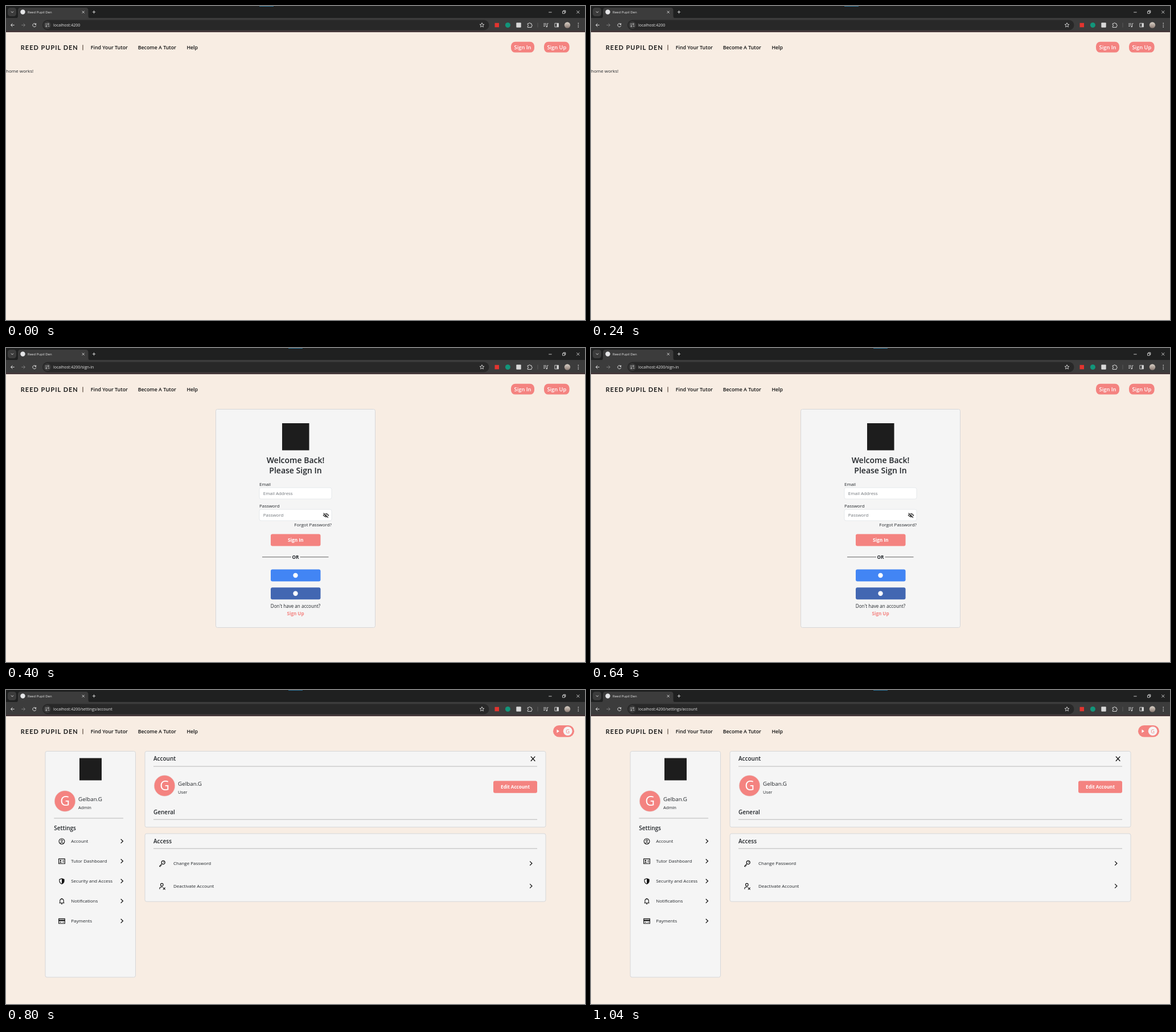
Animation of 1017 by 551 pixels, one loop 1.2 s. Source, as an HTML page:

```html
<!DOCTYPE html>
<html lang="en">
<head>
<meta charset="utf-8">
<title>Reed Pupil Den</title>
<style>
  html, body { margin: 0; width: 100%; height: 100%; overflow: hidden; background: #f8ede3; }
  svg { display: block; width: 100vw; height: 100vh; }
  text { font-family: "Open Sans", "Noto Sans", sans-serif; white-space: pre; }
</style>
</head>
<body>
<svg id="stage" viewBox="0 0 1017 551" preserveAspectRatio="none"></svg>
<script>
const INK = '#212529', CORAL = '#f48380', PANEL = '#f5f5f5', ICON = '#d6d6d6', BAR = '#3c3c3c';
const SITE = 'Reed Pupil Den', USER = 'Gelban.G';
const STEP = 400;
const PAGES = ['', '/sign-in', '/settings/account'];

const text = (x, y, str, size, o = {}) =>
  `<text x="${x}" y="${y}" font-size="${size}" fill="${o.fill || INK}" font-weight="${o.weight || 400}"` +
  ` text-anchor="${o.anchor || 'start'}" ${o.extra || ''}>${str}</text>`;
const rect = (x, y, w, h, fill, rx = 0, extra = '') =>
  `<rect x="${x}" y="${y}" width="${w}" height="${h}" rx="${rx}" fill="${fill}" ${extra}/>`;
const circle = (x, y, r, fill, extra = '') =>
  `<circle cx="${x}" cy="${y}" r="${r}" fill="${fill}" ${extra}/>`;
const line = (d, color = INK, width = 1, extra = '') =>
  `<path d="${d}" fill="none" stroke="${color}" stroke-width="${width}" ${extra}/>`;
const shape = (d, fill = INK) => `<path d="${d}" fill="${fill}" fill-rule="evenodd"/>`;
const at = (x, y, body) => `<g transform="translate(${x} ${y})">${body}</g>`;

const panel = (x, y, w, h) => rect(x, y, w, h, PANEL, 3, 'stroke="#cfd1d3" stroke-width=".8"');
const rule = (x1, x2, y) => line(`M${x1} ${y}H${x2}`, '#a9a9a9', .8);
const chevron = (x, y) => line(`M${x - 1.8} ${y - 3.6}l3.7 3.6l-3.7 3.6`, '#111', 1.25);
const center = (y, str, size, o = {}) => text(508.5, y, str, size, { anchor: 'middle', ...o });
const button = (x, y, w, h, label, size) =>
  rect(x, y, w, h, CORAL, 3) +
  text(x + w / 2, y + h / 2 + 3, label, size, { anchor: 'middle', weight: 700, fill: '#fff' });

function star(r, inner) {
  const pts = Array.from({ length: 10 }, (_, i) => {
    const a = i * Math.PI / 5 - Math.PI / 2, d = i % 2 ? inner : r;
    return `${(d * Math.cos(a)).toFixed(2)} ${(d * Math.sin(a)).toFixed(2)}`;
  });
  return 'M' + pts.join('L') + 'Z';
}

function titleBar() {
  return rect(0, 0, 1017, 22, '#1f2020') +
    rect(3, 3, 15, 15, BAR, 4.5) + line('M9 9.6l2 2l2-2', '#e3e3e3', 1) +
    shape('M17 21.5q4 0 4-4V7.500q0-4.500 4.500-4.500H140q4.500 0 4.500 4.500V17.500q0 4 4 4Z', BAR) +
    circle(29.5, 10.5, 4.2, '#e4e5e7') +
    text(38, 13, SITE, 6, { fill: '#e8e8e8' }) +
    line('M133.700 8.700l4 4m0-4l-4 4', '#e3e3e3', .9) +
    line('M151.800 10.600h5.400m-2.700-2.700v5.400', '#e3e3e3', .9) +
    line('M953.200 11h5.400', '#f0f0f0', .8) +
    line('M977.600 9.300h3.800v3.800h-3.800zM979 9.200v-1.200h3.800v3.800h-1.300', '#f0f0f0', .8) +
    line('M1002.300 8.200l5 5m0-5l-5 5', '#f0f0f0', .8) +
    '<rect id="mark" y="0" width="25" height="1" fill="#2c7196"/>';
}

function toolBar() {
  const arrow = 'M3.200 0H-2.800M0-3l-3 3l3 3';
  return rect(0, 21, 1017, 23, BAR) + rect(0, 43.3, 1017, 2.7, '#45373a') +
    at(11.5, 33.5, line(arrow, '#dcdcdc', 1)) +
    at(30.5, 33.5, `<g transform="scale(-1 1)">${line(arrow, '#7b7b7b', 1)}</g>`) +
    at(49.8, 33.5, line('M2.500-1.600A3 3 0 1 0 3 .7', '#dcdcdc', 1) + shape('M3.300-3.600v3.200H.1Z', '#dcdcdc')) +
    rect(64, 24.5, 784.5, 18, '#282828', 9) + circle(72.500, 33.500, 6.500, BAR) +
    line('M69.300 31.700h2.400M74 35.300h2.200', ICON, 1) +
    circle(74.300, 31.700, 1.100, 'none', `stroke="${ICON}" stroke-width=".9"`) +
    circle(70.800, 35.300, 1.100, 'none', `stroke="${ICON}" stroke-width=".9"`) +
    '<text id="url" x="83" y="36.100" font-size="7" fill="#e6e6e6"></text>' +
    at(836, 33.6, line(star(4.1, 1.8), ICON, .9)) +
    rect(858.5, 29.8, 7.5, 7.5, '#e3342f') +
    circle(881.4, 33.500, 4.500, '#12957a') +
    rect(896.3, 29.300, 8.400, 8.400, '#d8d8d8', 1) +
    line('M916.200 30.800h2.200a1.300 1.300 0 0 1 2.600 0h2v2.100a1.300 1.300 0 0 1 0 2.600v2h-6.800v-2.100a1.300 1.300 0 0 0 0-2.600z', ICON, 1) +
    line('M934 29.500v8', '#666', .7) +
    line('M944 30.900h5M944 33.200h5M944 35.500h3M950.600 36.200v-5.400h2', ICON, .9) + circle(949.700, 36.100, 1.200, ICON) +
    line('M963.900 30.300h6.500v6.500h-6.500z', ICON, .9) + rect(967.400, 30.300, 3.200, 6.500, ICON) +
    circle(986, 33.500, 5.200, 'url(#photo)') +
    [30.300, 33.500, 36.700].map(y => circle(1005.300, y, .85, ICON)).join('');
}

function siteHeader() {
  const nav = (x, s) => text(x, 75.7, s, 8.8, { weight: 600, fill: '#111' });
  return text(25.8, 76.7, SITE.toUpperCase(), 11,
      { weight: 700, fill: '#1b1b1b', extra: 'letter-spacing="1" style="font-family:Lato,sans-serif"' }) +
    line('M135 68.200v9.300', '#4a3a2e', 1.100) +
    nav(148.800, 'Find Your Tutor') + nav(231.700, 'Become A Tutor') + nav(317.400, 'Help');
}

function signButtons() {
  const pill = (x, w, s) => rect(x, 62.800, w, 18.800, CORAL, 7.500) +
    text(x + w / 2, 75.700, s, 9.25, { weight: 600, fill: '#fff', anchor: 'middle' });
  return pill(887, 41, 'Sign In') + pill(945, 44.600, 'Sign Up');
}

const home = () => signButtons() + text(0, 116.500, 'home works!', 8);

function signIn() {
  const field = (y, label, hint) => text(445, y - 3.600, label, 7.9) +
    rect(445, y, 127, 19.800, '#fff', 3, 'stroke="#dee2e6" stroke-width=".7"') +
    text(451.800, y + 12.700, hint, 7.9, { fill: '#70757a' });
  const social = (y, fill) => rect(465, y, 87.500, 21, fill, 3) + circle(508.500, y + 10.500, 4.200, '#fff');
  const eye = line('M-4.600 0Q0-6 4.600 0Q0 6-4.600 0Z', '#111', 1.200) + circle(0, 0, 1.900, '#111') +
    line('M-3.500-4.300L4.700 4', '#fff', 1.300) + line('M-4.300-3.900L3.900 4.400', '#111', 1.100);
  return signButtons() + panel(368.500, 107.500, 280, 383) +
    rect(485, 132, 47.500, 47.500, '#1d1d1d') +
    center(201.800, 'Welcome Back!', 14, { weight: 600 }) +
    center(219.800, 'Please Sign In', 14, { weight: 600 }) +
    field(245.100, 'Email', 'Email Address') + field(283.200, 'Password', 'Password') +
    at(562, 293.500, eye) +
    text(572, 312.600, 'Forgot Password?', 8, { anchor: 'end' }) +
    button(465, 326.500, 87.500, 21, 'Sign In', 8.3) +
    line('M450 366.800H501M516.500 366.800H566.500', '#3a3a3a', .8) +
    center(369.700, 'OR', 8.2, { weight: 700 }) +
    social(388.500, '#4285f4') + social(420.300, '#4267b2') +
    center(456.200, "Don't have an account?", 8.1) +
    center(469, 'Sign Up', 8.05, { weight: 700, fill: CORAL });
}

const icons = {
  person: circle(0, 0, 4.900, 'none', 'stroke="#111" stroke-width="1.100"') +
    circle(0, -1.300, 1.600, 'none', 'stroke="#111" stroke-width="1"') + line('M-3.300 3.400Q0 .600 3.300 3.400', '#111', 1),
  badge: line('M-5.400-4.200H5.400V4.200H-5.400Z', '#111', 1.100) + circle(-2.200, -1.200, 1.300, '#111') +
    shape('M-4.400 2.600Q-2.200-.800 0 2.600Z', '#111') + line('M1.300-1.400H4.200M1.300 1.100H4.200', '#111', 1),
  shield: shape('M0-5.300L4.600-3.500V0Q4.300 3.700 0 5.400Q-4.300 3.700-4.600 0V-3.500ZM0-4.100L-3.500-2.700V0Q-3.200 2.900 0 4.200Z', '#111'),
  bell: line('M-4.400 3.200H4.400M-3.200 3.200V-.600Q-3.200-4 0-4Q3.200-4 3.200-.600V3.200', '#111', 1.100) +
    circle(0, -4.600, .800, '#111') + circle(0, 4.700, 1, '#111'),
  card: line('M-5.300-4.200H5.300V4.200H-5.300Z', '#111', 1.100) + rect(-5.300, -2.400, 10.600, 2.300, '#111') +
    line('M-3.700 2H-1M1.500 2H3.700', '#111', .8),
  key: circle(1.900, -1.900, 3, 'none', 'stroke="#111" stroke-width="1.200"') + circle(2.500, -2.500, .800, '#111') +
    line('M-.300 .300L-5 5M-4.500 4.500l1.400 1.200M-2.700 2.700l1.300 1.300', '#111', 1.300),
  removeUser: circle(-.500, -2.700, 2.300, 'none', 'stroke="#111" stroke-width="1.100"') +
    line('M-4.400 5V3.600Q-4.200 1.400-1.400 1.400H.900', '#111', 1.100) + line('M1.600 2.200l3.800 3.800m0-3.800l-3.800 3.800', '#111', 1.100)
};

function account() {
  const menu = [
    ['person', 'Account'], ['badge', 'Tutor Dashboard'], ['shield', 'Security and Access'],
    ['bell', 'Notifications'], ['card', 'Payments']
  ].map(([icon, label], i) => {
    const y = 265.300 + i * 35;
    return at(98, y + .3, icons[icon]) + text(114.200, y + 2.900, label, 8) + chevron(203.500, y);
  }).join('');
  const profile = (x, y, role) =>
    circle(x, y, 18.300, CORAL, 'stroke="#e3dcdb" stroke-width=".6"') +
    text(x, y + 8.300, USER[0], 23, { anchor: 'middle', fill: '#fff' }) +
    text(x + 23.600, y + .3, USER, 9.8) + text(x + 23.600, y + 13.500, role, 7.5);
  const head = (x, y, s) => text(x, y, s, 10, { weight: 600 });
  const action = (y, icon, label) =>
    at(274.300, y + .4, icons[icon]) + text(294, y + 2.900, label, 8) + chevron(922, y);
  return rect(961, 62, 37, 20.600, CORAL, 10.300) + shape('M967.500 69.200l4.300 3l-4.300 3Z', '#fff') +
    circle(986.700, 72.200, 7.900, PANEL) +
    text(986.700, 75.500, USER[0], 9.2, { anchor: 'middle', fill: CORAL }) +
    panel(69, 107.500, 158.500, 396.500) + rect(129, 119.500, 39, 39, '#1d1d1d') +
    profile(103.500, 195, 'Admin') + rule(84.300, 206, 225) + head(84.300, 246.400, 'Settings') + menu +
    panel(244, 107.500, 704, 133.200) + head(259, 124.300, 'Account') +
    line('M921.900 116.600l7.400 8.200m0-8.200l-7.400 8.200', '#111', 1.400) +
    rule(259, 933, 134) + profile(278.500, 168, 'User') +
    button(856, 159.500, 77, 21.200, 'Edit Account', 8.1) +
    head(259, 217.600, 'General') + rule(259, 933, 227.200) +
    panel(244, 252, 704, 119.200) + head(259, 268.800, 'Access') + rule(259, 933, 278.200) +
    action(304.200, 'key', 'Change Password') + action(344, 'removeUser', 'Deactivate Account');
}

const stage = document.getElementById('stage');
stage.innerHTML =
  '<defs><linearGradient id="photo" x2="0" y2="1"><stop stop-color="#d8d0c6"/><stop offset="1" stop-color="#8d7c74"/></linearGradient></defs>' +
  rect(0, 0, 1017, 551, '#f8ede3') + titleBar() + toolBar() + siteHeader() +
  [home, signIn, account].map(view => `<g class="view">${view()}</g>`).join('');

const views = stage.querySelectorAll('.view');
const url = document.getElementById('url');
const mark = document.getElementById('mark');

function draw(ms) {
  const page = Math.floor(ms / STEP) % PAGES.length;
  views.forEach((v, i) => v.setAttribute('display', i === page ? 'inline' : 'none'));
  url.textContent = 'localhost:4200' + PAGES[page];
  mark.setAttribute('x', page ? 496 : 445);
}

const start = performance.now();
function tick() {
  draw(performance.now() - start);
  requestAnimationFrame(tick);
}
tick();
</script>
</body>
</html>
```
